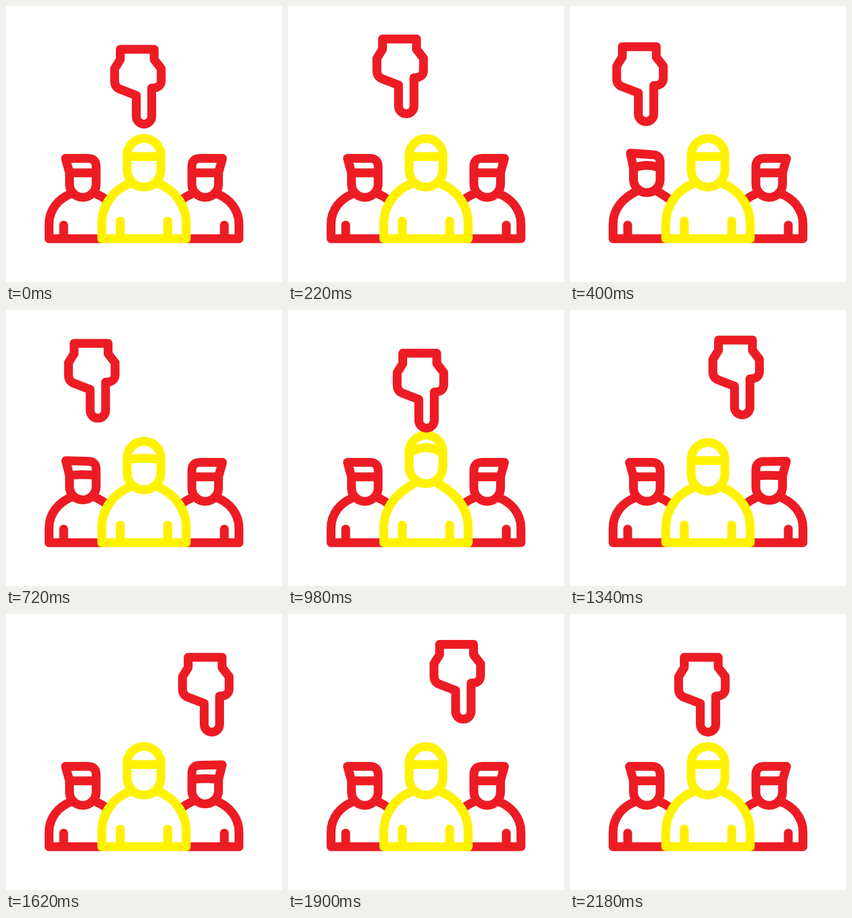
Animation, 500 px wide and 500 px high, one loop 2.4 s. Source, as an HTML page:

```html
<!DOCTYPE html>
<html lang="en">
<head>
<meta charset="utf-8">
<title>Choosing a person</title>
<style>
  html, body { margin: 0; width: 100%; height: 100%; overflow: hidden; background: #fff; }
  svg { display: block; width: 100%; height: 100%; }
  path { fill: none; stroke-width: 16; stroke-linecap: round; stroke-linejoin: round; }
  .red path { stroke: #ed1c24; }
  .yellow path { stroke: #fff200; }
</style>
</head>
<body>
<svg viewBox="0 0 500 500">
  <g class="red">
    <path id="left"/>
    <path id="right" transform="translate(500 0) scale(-1 1)"/>
  </g>
  <g class="yellow"><path id="middle"/></g>
  <g class="red">
    <path id="hand" d="M207 78.4H268.5V97L281.2 113.5V135Q281.2 148.7 264 148.7V200A14 14 0 0 1 236 200V162L206 150.5Q196.8 146.5 196.8 136V113.5L207 97Z"/>
  </g>
</svg>
<script>
const LOOP = 2400, STEP = 20, BASE = 421.6;
const $ = id => document.getElementById(id);

// Hand moves: start, end, from x, to x, height of the arc
const moves = [
  [0, 520, 0, -118, 21],
  [520, 1000, -118, 1, 20.5],
  [1060, 1620, 1, 123, 24],
  [1620, 2200, 123, 0, 23.5]
];

const ease = u => u < 0.5 ? 4 * u ** 3 : 1 - (2 - 2 * u) ** 3 / 2;

function handAt(t) {
  let x = 0, y = 0;
  for (const [start, end, from, to, rise] of moves) {
    if (t < start) break;
    const u = ease(Math.min(1, (t - start) / (end - start)));
    x = from + (to - from) * u;
    y = -rise * (1 - Math.abs(2 * u - 1) ** 2.4);
  }
  return [x, y];
}

// Smooth rise and fall of a person between two times
function lift(t, start, end, height) {
  const u = (t - start) / (end - start);
  return u > 0 && u < 1 ? height * Math.sin(Math.PI * u) ** 2 : 0;
}

const brim = (x1, x2, y, bend) => `M${x1} ${y}Q${(x1 + x2) / 2} ${y - bend} ${x2} ${y}`;

// The head moves by h; the shoulders only stretch near the neck
function sidePerson(h) {
  const tip = `${107.8 + h * 0.18} ${276 - h * 1.1}`;
  const top = 276 - h * 0.8, chin = 322.5 - h;
  const inward = h * 0.4, neck = h * 0.6;
  return `M115 ${302 - h}L${tip}L148 ${top}Q163.3 ${top} 163.3 ${291 - h}` +
    `V${chin}A24.15 24.15 0 0 1 115 ${chin}Z` +
    brim(115, 163.3, 302.3 - h, h * 1.15) +
    `M${121 + inward} ${339 - neck}C94 348 78 ${370 - h * 0.1} 78 395V${BASE}H173` +
    `M${158 - inward} ${338.5 - neck}C167 341.5 175 345.5 181 351` +
    `M104.5 397V${BASE}`;
}

function middlePerson(h) {
  const crown = 270.5 - h, chin = 297.5 - h;
  const inward = h * 0.4, neck = 322 - h * 0.6, side = 362 - h * 0.1;
  return `M219.5 ${crown}A30.5 30.5 0 0 1 280.5 ${crown}` +
    `V${chin}A30.5 30.5 0 0 1 219.5 ${chin}Z` +
    brim(219.5, 280.5, 272.8 - h, h * 1.55) +
    `M${223 + inward} ${neck}C193 334 173.5 ${side} 173.5 395V${BASE}H326.5V395` +
    `C326.5 ${side} 307 334 ${277 - inward} ${neck}` +
    `M207 389.5V${BASE}M293 389.5V${BASE}`;
}

function draw(t) {
  const [x, y] = handAt(t);
  $('hand').setAttribute('transform', `translate(${x} ${y})`);
  $('left').setAttribute('d', sidePerson(lift(t, 240, 800, 14)));
  $('middle').setAttribute('d', middlePerson(lift(t, 640, 1240, 14)));
  $('right').setAttribute('d', sidePerson(lift(t, 1290, 1680, 12)));
}

const begin = performance.now();
function tick() {
  const t = (performance.now() - begin) % LOOP;
  draw(Math.floor(t / STEP) * STEP);
  requestAnimationFrame(tick);
}
tick();
</script>
</body>
</html>
```
